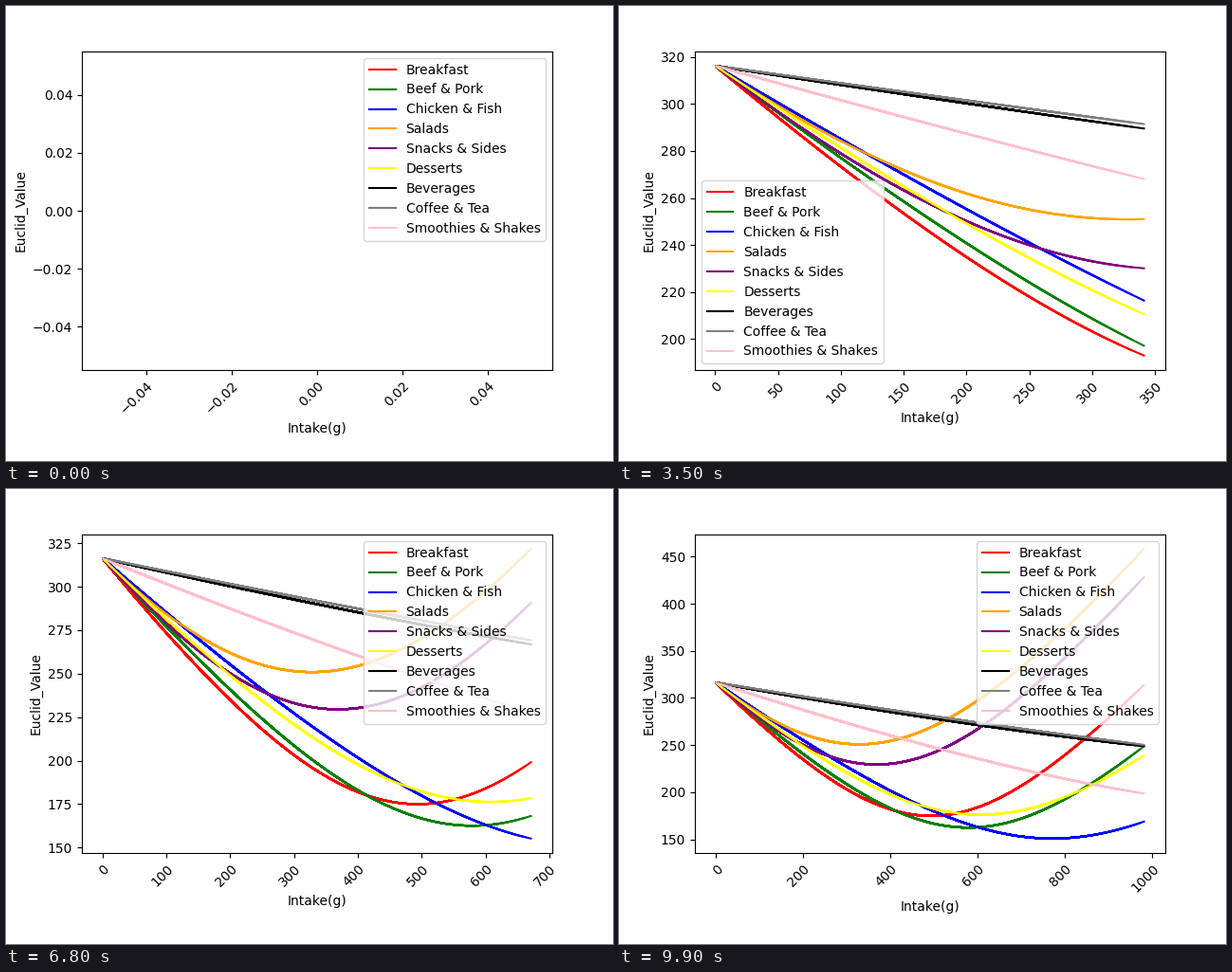
Animation, 640 px wide and 480 px high, one loop 10000 ms. Source, as a matplotlib script:

```python
import numpy as np
import matplotlib.pyplot as plt
from matplotlib.animation import FuncAnimation
from matplotlib.collections import PathCollection
from matplotlib.path import Path

FRAMES, STEP = 100, 10
START_SQ = 1e5  # squared distance at zero intake

# name, colour, intake at the minimum, distance at the minimum
GROUPS = [
    ("Breakfast", "red", 493.3, 175.0),
    ("Beef & Pork", "green", 579.0, 162.6),
    ("Chicken & Fish", "blue", 771.0, 151.0),
    ("Salads", "orange", 328.0, 250.9),
    ("Snacks & Sides", "purple", 368.6, 229.5),
    ("Desserts", "yellow", 607.5, 176.3),
    ("Beverages", "black", 1927.3, 223.4),
    ("Coffee & Tea", "gray", 2494.7, 202.2),
    ("Smoothies & Shakes", "pink", 1435.8, 181.0),
]
COLORS = [g[1] for g in GROUPS]


def distance(x, low_x, low_y):
    return np.sqrt(low_y**2 + (START_SQ - low_y**2) * (x / low_x - 1) ** 2)


fine_x = np.arange(1, FRAMES * STEP)
fine = np.array([np.column_stack([fine_x, distance(fine_x, mx, my)])
                 for _, _, mx, my in GROUPS])
curves = fine[:, ::STEP]

# Every step plots the curves again on top of all the earlier ones.
prefixes = [Path(c[:k]) for k in range(2, FRAMES) for c in curves]

fig, ax = plt.subplots(figsize=(6.4, 4.8), dpi=100)
fig.subplots_adjust(bottom=0.2, top=0.9)
ax.set_xlabel("Intake(g)")
ax.set_ylabel("Euclid_Value")

trail = PathCollection([], facecolors="none", edgecolors=COLORS,
                       linewidths=1.5, capstyle="projecting",
                       joinstyle="round", zorder=1.9)
ax.add_collection(trail, autolim=False)
lines = [ax.plot([], [], color=color, label=name)[0]
         for name, color, _, _ in GROUPS]
legend = ax.legend(loc="upper right")


def clutter(n, loc):
    """Count the points and lines that a legend at loc would cover."""
    legend.set_loc(loc)
    box = legend.get_window_extent()
    pts = fine[:, :STEP * (n - 1) + 1]
    pix = ax.transData.transform(pts.reshape(-1, 2)).reshape(pts.shape)
    inside = ((pix > box.min) & (pix < box.max)).all(axis=2)
    hits = inside * (n - np.ceil(np.arange(pts.shape[1]) / STEP))
    return hits[:, ::STEP].sum() + hits.max(axis=1).sum()


def place_legend(n):
    loc = "upper right"
    if n > 1 and clutter(n, "lower left") < clutter(n, loc):
        loc = "lower left"
    legend.set_loc(loc)


def update(n):
    trail.set_paths(prefixes[:max(n - 2, 0) * len(GROUPS)])
    for line, curve in zip(lines, curves):
        line.set_data(curve[:n, 0], curve[:n, 1])
    ax.relim()
    ax.autoscale_view()
    plt.setp(ax.get_xticklabels(), rotation=45, ha="right",
             rotation_mode="anchor")
    place_legend(n)
    return [trail, *lines, legend]


anim = FuncAnimation(fig, update, frames=FRAMES, interval=100,
                     init_func=lambda: update(0), repeat=True,
                     repeat_delay=0, blit=False)
plt.show()
```
